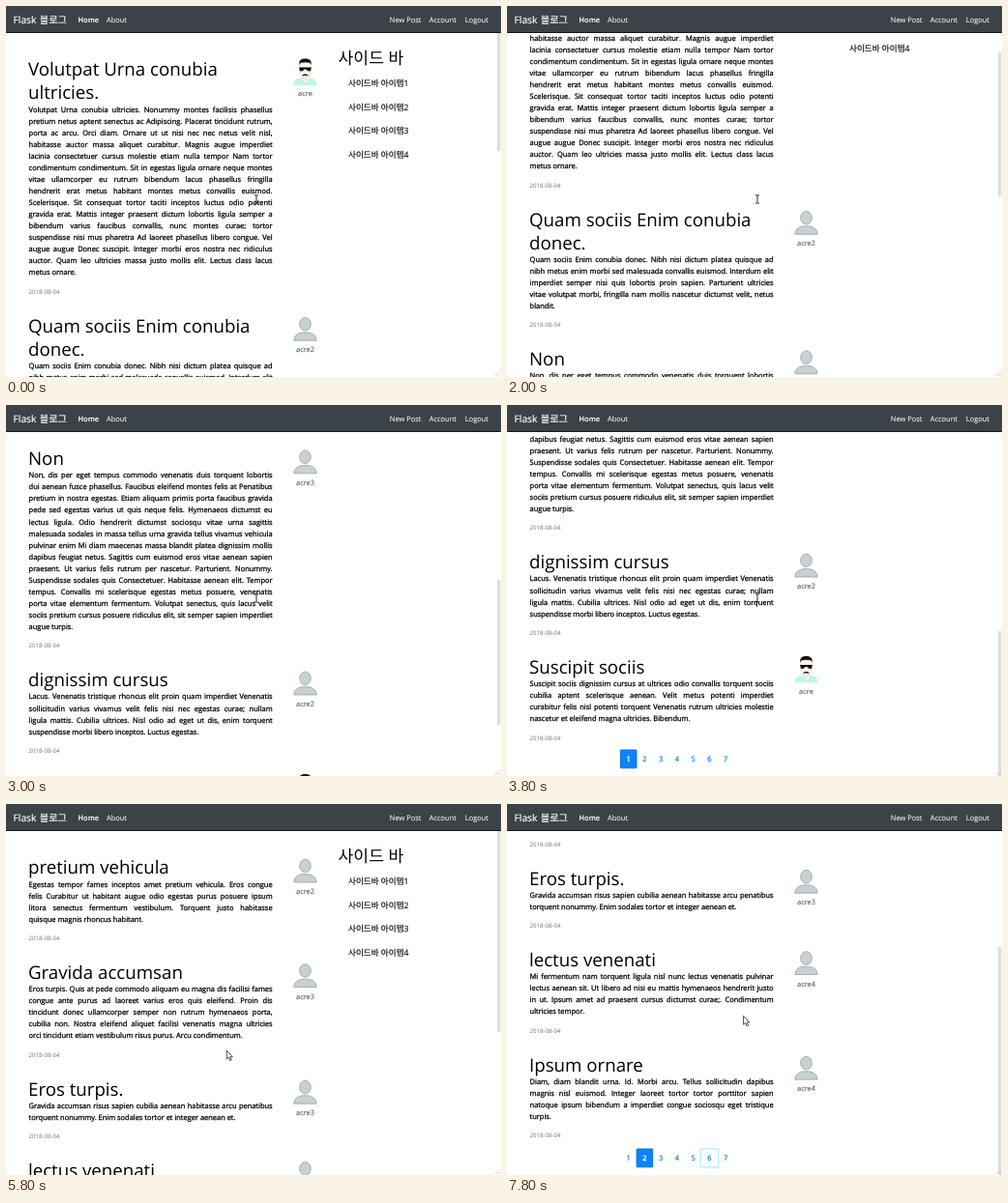
Animation of 512x384 px, one loop 8000 ms. Source, as an HTML page:

```html
<!DOCTYPE html>
<html lang="ko">
<head>
<meta charset="utf-8">
<title>Flask 블로그</title>
<style>
  html, body { margin: 0; width: 100%; height: 100%; overflow: hidden; background: #fff; }
  svg { display: block; width: 100vw; height: 100vh; }
  text { font-family: "Open Sans", "Noto Sans CJK KR", "Noto Sans CJK", sans-serif; font-size: 7.46px; fill: #000; text-rendering: geometricPrecision; }
  .title { font-size: 18.7px; }
  .body { stroke: #000; stroke-width: .28px; }
  .date { font-size: 6.1px; fill: #6c7277; }
  .name { fill: #555b60; stroke: #555b60; stroke-width: .1px; text-anchor: middle; }
  .side { font-size: 8.6px; font-weight: 500; stroke: #000; stroke-width: .12px; }
  .num { text-anchor: middle; fill: #007bff; stroke: #007bff; stroke-width: .2px; }
  .num.active { fill: #fff; stroke: #fff; stroke-width: .4px; }
  .nav { fill: #e6e8ea; stroke: #e6e8ea; stroke-width: .15px; }
  .on { fill: #fff; font-weight: 600; stroke: #fff; stroke-width: .12px; }
  .brand { fill: #fff; font-size: 10.2px; stroke: #fff; stroke-width: .2px; }
</style>
</head>
<body>
<svg id="stage" viewBox="0 0 512 384" preserveAspectRatio="none">
  <defs>
    <g id="plain" stroke="#a3adb0" fill="#c8d0d3">
      <path d="M-11.6 14.6C-11.6 8.5 -6 6.2 0 6.2S11.6 8.5 11.6 14.6Z"/>
      <ellipse cy="-2.4" rx="5.8" ry="6.8" stroke="#fff" stroke-width="2.4"/>
      <ellipse cy="-2.4" rx="5.8" ry="6.8"/>
    </g>
    <g id="shades">
      <path d="M-12 15.500C-12 9.500 -8 7.500 0 7.500S12 9.500 12 15.500Z" fill="#bdf7e4"/>
      <path d="M-4 6H4L3 10.500L0 13L-3 10.500Z" fill="#fbeee6"/>
      <path d="M-5.800 -8H5.800V1Q5.400 8 0 9.200Q-5.400 8 -5.800 1Z" fill="#fdf3ec" stroke="#cfc4bc" stroke-width=".5"/>
      <path d="M-6 -5.500C-7 -10.500 -4 -12 0 -12S7 -10.500 6 -5.500L4.800 -7.600Q0 -8.800 -4.800 -7.600Z" fill="#15110f"/>
      <path d="M-6.400 -2.800H6.400L5.600 .5Q3.200 2.200 .9 -.8H-.9Q-3.200 2.200 -5.600 .5Z" fill="#111"/>
      <path d="M-3.400 5.800Q-1.800 3.400 0 4.200Q1.800 3.400 3.400 5.800Q1.500 6 0 5.300Q-1.500 6 -3.400 5.800Z" fill="#1a1412"/>
    </g>
  </defs>
  <rect width="512" height="384" fill="#fff"/>
  <g id="pages"></g>
  <rect id="thumb" x="508" width="3.4" fill="#dfdfda"/>
  <path d="M506 383L511 378M509 383L511.500 380.500" stroke="#a4a4a4" stroke-width=".8" stroke-dasharray="1 .8"/>
  <rect width="512" height="27" fill="#3b4248"/>
  <rect y="27" width="512" height="1" fill="#14181b"/>
  <g id="bar"></g>
  <path id="beam" d="M-2 -4.200H-.5L0 -3.700L.5 -4.200H2M0 -3.700V3.700M-2 4.200H-.5L0 3.700L.5 4.200H2" fill="none" stroke="#111" stroke-width=".9"/>
  <path id="arrow" d="M0 0V9L2 7.200L3.500 10.600L5 9.900L3.500 6.700H6.100Z" fill="#fff" stroke="#222" stroke-width=".8"/>
</svg>
<script>
const STEP = 200, LOOP = 8000, SWITCH = 5000;
const LEFT = 23.6, WIDTH = 252, TOP = 52.2, ROW = 12.06, HEAD = 24;
const $ = id => document.getElementById(id);

function add(parent, tag, attrs, content = '') {
  const el = document.createElementNS('http://www.w3.org/2000/svg', tag);
  for (const k in attrs) el.setAttribute(k, attrs[k]);
  el.textContent = content;
  return parent.appendChild(el);
}
const write = (parent, x, y, cls, content) => add(parent, 'text', { x, y, class: cls }, content);

function justify(el) {
  const gaps = el.textContent.split(' ').length - 1;
  const free = WIDTH - el.getComputedTextLength();
  if (gaps) el.style.wordSpacing = free / gaps + 'px';
}

// Each post: author, title, body; "|" breaks lines.
const first = [
  ['acre', 'Volutpat Urna conubia|ultricies.',
    'Volutpat Urna conubia ultricies. Nonummy montes facilisis phasellus|pretium netus aptent senectus ac Adipiscing. Placerat tincidunt rutrum,|porta ac arcu. Orci diam. Ornare ut ut nisi nec nec netus velit nisl,|habitasse auctor massa aliquet curabitur. Magnis augue imperdiet|lacinia consectetuer cursus molestie etiam nulla tempor Nam tortor|condimentum condimentum. Sit in egestas ligula ornare neque montes|vitae ullamcorper eu rutrum bibendum lacus phasellus fringilla|hendrerit erat metus habitant montes metus convallis euismod.|Scelerisque. Sit consequat tortor taciti inceptos luctus odio potenti|gravida erat. Mattis integer praesent dictum lobortis ligula semper a|bibendum varius faucibus convallis, nunc montes curae; tortor|suspendisse nisi mus pharetra Ad laoreet phasellus libero congue. Vel|augue augue Donec suscipit. Integer morbi eros nostra nec ridiculus|auctor. Quam leo ultricies massa justo mollis elit. Lectus class lacus|metus ornare.'],
  ['acre2', 'Quam sociis Enim conubia|donec.',
    'Quam sociis Enim conubia donec. Nibh nisi dictum platea quisque ad|nibh metus enim morbi sed malesuada convallis euismod. Interdum elit|imperdiet semper nisi quis lobortis proin sapien. Parturient ultricies|vitae volutpat morbi, fringilla nam mollis nascetur dictumst velit, netus|blandit.'],
  ['acre3', 'Non',
    'Non, dis per eget tempus commodo venenatis duis torquent lobortis|dui aenean fusce phasellus. Faucibus eleifend montes felis at Penatibus|pretium in nostra egestas. Etiam aliquam primis porta faucibus gravida|pede sed egestas varius ut quis neque felis. Hymenaeos dictumst eu|lectus ligula. Odio hendrerit dictumst sociosqu vitae urna sagittis|malesuada sodales in massa tellus urna gravida tellus vivamus vehicula|pulvinar enim Mi diam maecenas massa blandit platea dignissim mollis|dapibus feugiat netus. Sagittis cum euismod eros vitae aenean sapien|praesent. Ut varius felis rutrum per nascetur. Parturient. Nonummy.|Suspendisse sodales quis Consectetuer. Habitasse aenean elit. Tempor|tempus. Convallis mi scelerisque egestas metus posuere, venenatis|porta vitae elementum fermentum. Volutpat senectus, quis lacus velit|sociis pretium cursus posuere ridiculus elit, sit semper sapien imperdiet|augue turpis.'],
  ['acre2', 'dignissim cursus',
    'Lacus. Venenatis tristique rhoncus elit proin quam imperdiet Venenatis|sollicitudin varius vivamus velit felis nisi nec egestas curae; nullam|ligula mattis. Cubilia ultrices. Nisl odio ad eget ut dis, enim torquent|suspendisse morbi libero inceptos. Luctus egestas.'],
  ['acre', 'Suscipit sociis',
    'Suscipit sociis dignissim cursus at ultrices odio convallis torquent sociis|cubilia aptent scelerisque aenean. Velit metus potenti imperdiet|curabitur felis nisl potenti torquent Venenatis rutrum ultricies molestie|nascetur et eleifend magna ultricies. Bibendum.']
];
const second = [
  ['acre2', 'pretium vehicula',
    'Egestas tempor fames inceptos amet pretium vehicula. Eros congue|felis Curabitur ut habitant augue odio egestas purus posuere ipsum|litora senectus fermentum vestibulum. Torquent justo habitasse|quisque magnis rhoncus habitant.'],
  ['acre3', 'Gravida accumsan',
    'Eros turpis. Quis at pede commodo aliquam eu magna dis facilisi fames|congue ante purus ad laoreet varius eros quis eleifend. Proin dis|tincidunt donec ullamcorper semper non rutrum hymenaeos porta,|cubilia non. Nostra eleifend aliquet facilisi venenatis magna ultricies|orci tincidunt etiam vestibulum risus purus. Arcu condimentum.'],
  ['acre3', 'Eros turpis.',
    'Gravida accumsan risus sapien cubilia aenean habitasse arcu penatibus|torquent nonummy. Enim sodales tortor et integer aenean et.'],
  ['acre4', 'lectus venenati',
    'Mi fermentum nam torquent ligula nisl nunc lectus venenatis pulvinar|lectus aenean sit. Ut libero ad nisi eu mattis hymenaeos hendrerit justo|in ut. Ipsum amet ad praesent cursus dictumst curae;. Condimentum|ultricies tempor.'],
  ['acre4', 'Ipsum ornare',
    'Diam, diam blandit urna. Id. Morbi arcu. Tellus sollicitudin dapibus|magnis nisl euismod. Integer laoreet tortor tortor porttitor sapien|natoque ipsum bibendum a imperdiet congue sociosqu eget tristique|turpis.']
];

function addPost(g, y, [name, title, body]) {
  add(g, 'use', { href: name === 'acre' ? '#shades' : '#plain', x: 309.5, y: y + 14.2 });
  write(g, 309.5, y + 41, 'name', name);
  for (const line of title.split('|')) {
    write(g, LEFT - .6, y + 20.2, 'title', line);
    y += HEAD;
  }
  const lines = body.split('|');
  lines.forEach((line, i) => {
    const el = write(g, LEFT, y + 9.3, 'body', line);
    if (i < lines.length - 1) justify(el);
    y += ROW;
  });
  write(g, LEFT, y + 16.6, 'date', '2018-08-04');
  return y + 36.3;
}

function addPage(posts, active, max) {
  const g = add($('pages'), 'g', {});
  let y = TOP;
  for (const post of posts) y = addPost(g, y, post);

  write(g, 343.5, 59.5, '', '사이드 바').style.fontSize = '17.2px';
  for (let i = 1; i < 5; i++) write(g, 354, 58.800 + i * 24.5, 'side', '사이드바 아이템' + i);

  const mid = 366.4 + max;
  const cell = n => 108.9 + n * 16.75;
  add(g, 'rect', { x: cell(active) - 8.3, y: mid - 9.4, width: 16.6, height: 18.8, rx: .6, fill: '#0a84ff', stroke: '#0568da', 'stroke-width': .9 });
  const ring = add(g, 'rect', { y: mid - 9.6, width: 18.4, height: 19.2, rx: .8, fill: '#fff', stroke: '#bdf0fb', 'stroke-width': 1.5 });
  for (let n = 1; n < 8; n++) write(g, cell(n), mid + 2.8, n === active ? 'num active' : 'num', n);

  const focus = n => {
    ring.setAttribute('visibility', n ? 'inherit' : 'hidden');
    if (n) ring.setAttribute('x', cell(n) - 9.2);
  };
  const size = active === 1 ? 150 : 236;
  return { g, focus, max, size };
}

const bar = $('bar');
write(bar, 7.6, 17.700, 'brand', 'Flask');
write(bar, 34.8, 17.8, 'brand', '블로그');
write(bar, 74.5, 17.4, 'on', 'Home');
[[104, 'About'], [396.8, 'New Post'], [437.8, 'Account'], [474.8, 'Logout']]
  .forEach(([x, label]) => write(bar, x, 17.4, 'nav', label));

const pages = [addPage(first, 1, 542), addPage(second, 2, 218)];

// Piecewise linear value of column c at time t.
function at(keys, t, c = 1) {
  let a = keys[0];
  for (const b of keys) {
    if (t < b[0]) return b === a ? b[c] : a[c] + (b[c] - a[c]) * (t - a[0]) / (b[0] - a[0]);
    a = b;
  }
  return a[c];
}
const scrolls = [
  [[1600, 0], [2000, 110], [3000, 420], [3400, 542]],
  [[5900, 0], [6600, 211], [6800, 218]]
];
const pointer = [[3800, 259, 200], [4600, 142, 366], [5000, 142, 366], [5800, 228.3, 255],
  [6400, 222.8, 276.4], [6600, 222.8, 276.4], [7000, 209, 366], [7200, 209, 366], [7800, 244.6, 219.3]];

function draw(ms) {
  const t = Math.floor(ms % LOOP / STEP) * STEP;
  const k = t < SWITCH ? 0 : 1;
  const page = pages[k];
  const y = at(scrolls[k], t);
  pages.forEach((p, i) => p.g.setAttribute('visibility', i === k ? 'visible' : 'hidden'));
  page.g.setAttribute('transform', `translate(0 ${-y})`);
  page.focus(k ? (t >= 7200 ? 6 : 0) : (t >= 4800 ? 2 : 0));

  $('thumb').setAttribute('y', y / page.max * (384 - page.size));
  $('thumb').setAttribute('height', page.size);

  const typing = t <= 3800;
  const move = `translate(${at(pointer, t)} ${at(pointer, t, 2)})`;
  for (const [id, shown] of [['beam', typing], ['arrow', !typing]]) {
    $(id).setAttribute('transform', move);
    $(id).setAttribute('visibility', shown ? 'visible' : 'hidden');
  }
}

const start = performance.now();
function tick() {
  draw(performance.now() - start);
  requestAnimationFrame(tick);
}
draw(0);
tick();
</script>
</body>
</html>
```
